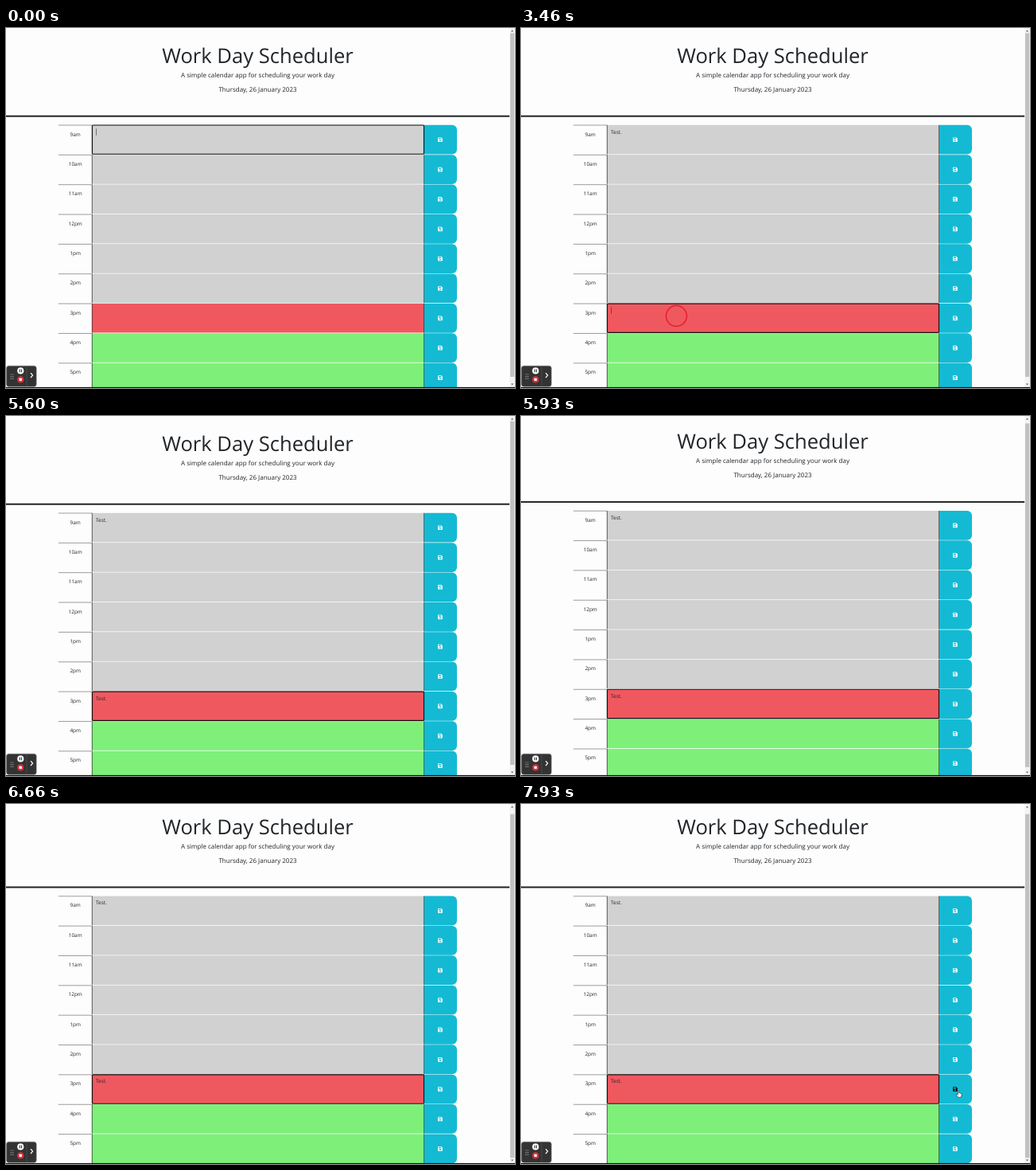
An HTML page that plays this animation: 640x452 px, repeating every 8 s.

```html
<!DOCTYPE html>
<html lang="en">
<head>
<meta charset="utf-8">
<title>Work Day Scheduler</title>
<style>
  html, body { margin: 0; width: 100%; height: 100%; overflow: hidden; background: #fdfdfd; }
  svg { display: block; width: 640px; height: 452px; }
  text { font-family: "Open Sans", "Noto Sans", sans-serif; font-size: 6.4px; fill: #212529; text-rendering: geometricPrecision; white-space: pre; }
  .mid { text-anchor: middle; }
  .title { font-size: 25.6px; }
  .lead { font-size: 8px; }
</style>
</head>
<body>
<svg id="stage" viewBox="0 0 640 452">
  <rect width="640" height="452" fill="#fdfdfd"/>
  <g id="page">
    <text class="mid title" x="316.5" y="44">Work Day Scheduler</text>
    <text class="mid lead" x="316.5" y="61.9">A simple calendar app for scheduling your work day</text>
    <text class="mid lead" x="316.5" y="80.3">Thursday, 26 January 2023</text>
    <rect y="109.7" width="633.3" height="2" fill="#212226"/>
    <g id="rows"></g>
    <rect id="focus" x="108.5" width="417" height="36.3" rx="1.2" fill="none" stroke="#111" stroke-width="1.1"/>
    <g id="notes"></g>
    <rect id="caret" width="0.6" height="8.4" fill="#333"/>
  </g>
  <circle id="ring" cx="195.4" cy="361.6" r="13" fill="none" stroke="#e5202d" stroke-width="1.5"/>
  <g id="hand" fill="#fff" stroke="#222" stroke-width="0.6" stroke-linejoin="round">
    <path d="M-.7 .5Q0-.6 .7 .5V3Q1.5 2.6 1.9 3.3Q2.7 3 3 3.7Q4 3.5 4 4.6V6.3L3.2 8.4H-.6L-2.7 5.2Q-2.6 4.1-1.6 4.6L-.7 5.4Z"/>
  </g>
  <rect x="633.3" width="6.7" height="452" fill="#f3f3f3"/>
  <rect id="thumb" x="634" width="5.2" height="431.5" fill="#c1c1c1"/>
  <path d="M634.9 4.4L636.5 2.4L638.1 4.4Z" fill="#606060"/>
  <path d="M634.9 446.4L636.5 448.4L638.1 446.4Z" fill="#606060"/>
  <rect y="450.9" width="640" height="1.1" fill="#111"/>
  <g id="recorder">
    <rect x="0.6" y="424.2" width="37.6" height="26" rx="3" fill="#333" stroke="#777" stroke-width="0.6"/>
    <path d="M26 425.5V449" stroke="#555" stroke-width="0.7"/>
    <path d="M6.3 434.4V441M8.7 434.4V441" stroke="#aaa" stroke-width="1.1" stroke-dasharray="1.1 1.6"/>
    <circle cx="18.3" cy="430.4" r="4.1" fill="#fff"/>
    <path d="M17.2 428.6V432.2M19.4 428.6V432.2" stroke="#333" stroke-width="1.1"/>
    <circle cx="18.3" cy="441.4" r="4.1" fill="#d8303c"/>
    <rect x="16.7" y="439.8" width="3.2" height="3.2" rx="0.4" fill="#fff"/>
    <path d="M31 433.2L33.6 436.1L31 439" fill="none" stroke="#fff" stroke-width="1.2"/>
  </g>
</svg>
<script>
const $ = id => document.getElementById(id);
const NS = "http://www.w3.org/2000/svg";
const LOOP = 8000, FPS = 15;
const TOP = 121.8, STEP = 37.35, BODY = 36.6;
const NOTE = "Test.", NOTE_X = 113;
const hours = ["9am", "10am", "11am", "12pm", "1pm", "2pm", "3pm", "4pm", "5pm"];
const PRESENT = 6;
const rowTop = i => TOP + i * STEP;

function add(parent, tag, attrs, text) {
  const el = document.createElementNS(NS, tag);
  for (const key in attrs) el.setAttribute(key, attrs[key]);
  if (text) el.textContent = text;
  return parent.appendChild(el);
}

function set(el, attrs) {
  for (const key in attrs) el.setAttribute(key, attrs[key]);
}

const icons = hours.map((hour, i) => {
  const rows = $("rows"), y = rowTop(i);
  const fill = i < PRESENT ? "#d1d1d1" : i === PRESENT ? "#f0585f" : "#7ef07a";
  add(rows, "path", { d: `M66.3 ${y + .2}H108`, stroke: "#333", "stroke-width": .8, "stroke-dasharray": "1.2 .8" });
  add(rows, "text", { class: "mid", x: 87.2, y: y + 13.7 }, hour);
  add(rows, "rect", { x: 108, y, width: 418, height: BODY, fill });
  add(rows, "path", { d: `M108.3 ${y}v${BODY}M525.6 ${y}v${BODY}`, stroke: "#222", "stroke-width": .7 });
  add(rows, "path", { d: `M526 ${y}h35a6 6 0 0 1 6 6v${BODY - 11.8}a6 6 0 0 1 -6 6h-35z`, fill: "#14bad3" });
  return add(rows, "path", {
    transform: `translate(543 ${y + 15.6})`, fill: "#fff", "fill-rule": "evenodd",
    d: "M.7 0H4.4L5.8 1.4V5Q5.8 5.7 5.1 5.7H.7Q0 5.7 0 5V.7Q0 0 .7 0ZM.9 .8V2.2H4V.8ZM2.9 3.1a.9 .9 0 1 0 .01 0Z"
  });
});

// Each entry: row, key times, and the moments the caret toggles.
const entries = [
  { row: 0, keys: [1000, 1200, 1330, 1530, 1660], blinks: [130, 660, 2200, 2660, 3260] },
  { row: PRESENT, keys: [4200, 4400, 4600, 4860, 5060], blinks: [4000, 4200, 5600, 6130, 6660, 7190, 7730] }
];
for (const e of entries)
  e.label = add($("notes"), "text", { x: NOTE_X, y: rowTop(e.row) + 10.8 });

const passed = (times, t) => times.filter(x => x <= t).length;
const clamp = x => Math.min(1, Math.max(0, x));
const smooth = x => x * x * (3 - 2 * x);

function draw(time) {
  const t = Math.floor((time + 7) * FPS / 1000) * 1000 / FPS + 1;

  for (const e of entries) e.label.textContent = NOTE.slice(0, passed(e.keys, t));
  const active = entries[t < 3460 ? 0 : 1];
  const y = rowTop(active.row);
  set($("focus"), { y: y + .2 });
  const typed = active.label.textContent ? active.label.getComputedTextLength() : 0;
  const caretOn = passed(active.blinks, t) % 2 === 0;
  set($("caret"), { x: NOTE_X + typed + .3, y: y + 4.5, opacity: caretOn ? 1 : 0 });

  const scroll = t < 5930 ? 0 : 6.2 * (1 - Math.exp(-(t - 5880) / 90));
  set($("page"), { transform: `translate(0 ${-scroll})` });
  set($("thumb"), { y: 6.5 + scroll });

  set($("ring"), { opacity: t < 3460 ? 0 : 1 - clamp((t - 3470) / 190) });

  const reach = smooth(clamp((t - 6800) / 600));
  const settle = smooth(clamp((t - 7400) / 250));
  const x = 195 + 367 * reach - 12 * settle;
  const over = x > 526;
  set($("hand"), { transform: `translate(${x} ${360.2 - settle * .4})`, opacity: over ? 1 : 0 });
  icons[PRESENT].setAttribute("fill", over ? "#111" : "#fff");
}

function tick(now) {
  draw(now % LOOP);
  requestAnimationFrame(tick);
}
draw(0);
requestAnimationFrame(tick);
</script>
</body>
</html>
```
